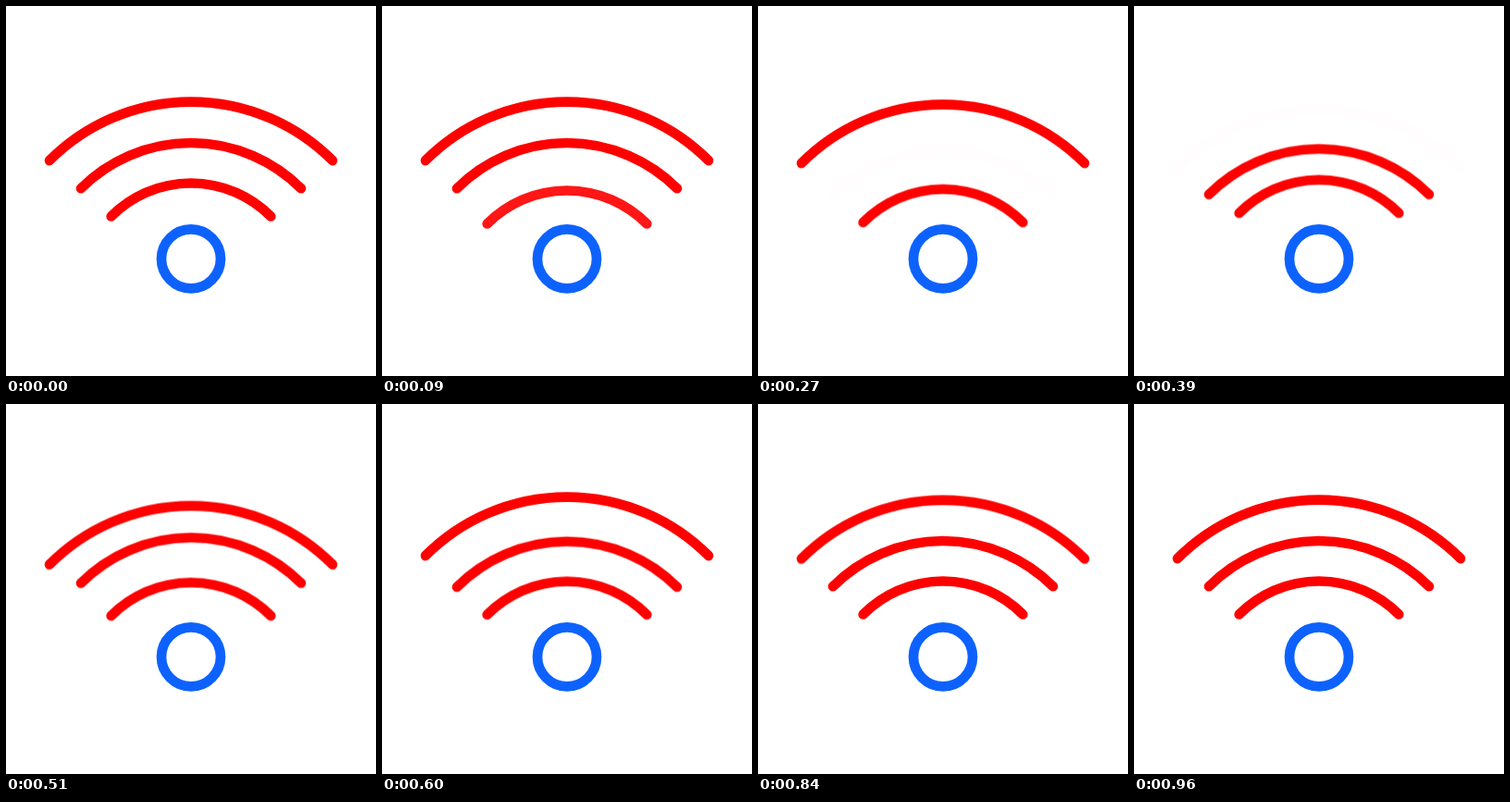
An HTML page that plays this animation: 400x400 px, repeating every 1050 ms.

```html
<!DOCTYPE html>
<html lang="en">
<head>
<meta charset="utf-8">
<title>Signal waves</title>
<style>
  html, body { margin: 0; width: 100%; height: 100%; overflow: hidden; background: #fff; }
  svg { display: block; width: 100%; height: 100%; fill: none; stroke-width: 10.67; stroke-linecap: round; }
  .wave { stroke: #f00; }
  .dot { stroke: #0d62fe; }
</style>
</head>
<body>
<svg viewBox="0 0 400 400">
  <path class="wave" d="M113.7 227.5A121.4 121.4 0 0 1 286.3 227.5"/>
  <path class="wave" d="M81 197.2A168.5 168.5 0 0 1 319 197.2"/>
  <path class="wave" d="M47 167.1A216 216 0 0 1 353 167.1"/>
  <circle class="dot" cx="200" cy="273.33" r="32"/>
</svg>
<script>
const LOOP = 1050, TICK = 30, STAGGER = 120;
const DEPTH = 8, SINK = 75, RELEASE = 250, REST = 720;
const SWING = 145, DAMPING = 0.0057;
const FADE_MID = 162, FADE_HALF = 100;

const smooth = u => u * u * (3 - 2 * u);
const cubic = u => u < 0.5 ? 4 * u ** 3 : 1 - 4 * (1 - u) ** 3;

// Sink quickly, hold, then spring back up and settle.
function drop(t) {
  if (t >= REST) return 0;
  if (t < RELEASE) return DEPTH * smooth(Math.min(t / SINK, 1));
  const s = t - RELEASE;
  return DEPTH * Math.exp(-DAMPING * s) * Math.cos(Math.PI * s / SWING);
}

const fade = t => cubic(Math.min(Math.abs(t - FADE_MID) / FADE_HALF, 1));

const frames = [];
for (let t = 0; t <= LOOP; t += TICK) {
  frames.push({
    offset: t / LOOP,
    transform: `translateY(${drop(t).toFixed(3)}px)`,
    opacity: fade(t),
    easing: 'step-end'
  });
}

document.querySelectorAll('.wave').forEach((wave, i) => {
  // One millisecond early keeps each tick clear of rounding.
  wave.animate(frames, { duration: LOOP, delay: i * STAGGER - 1, iterations: Infinity });
});
</script>
</body>
</html>
```
